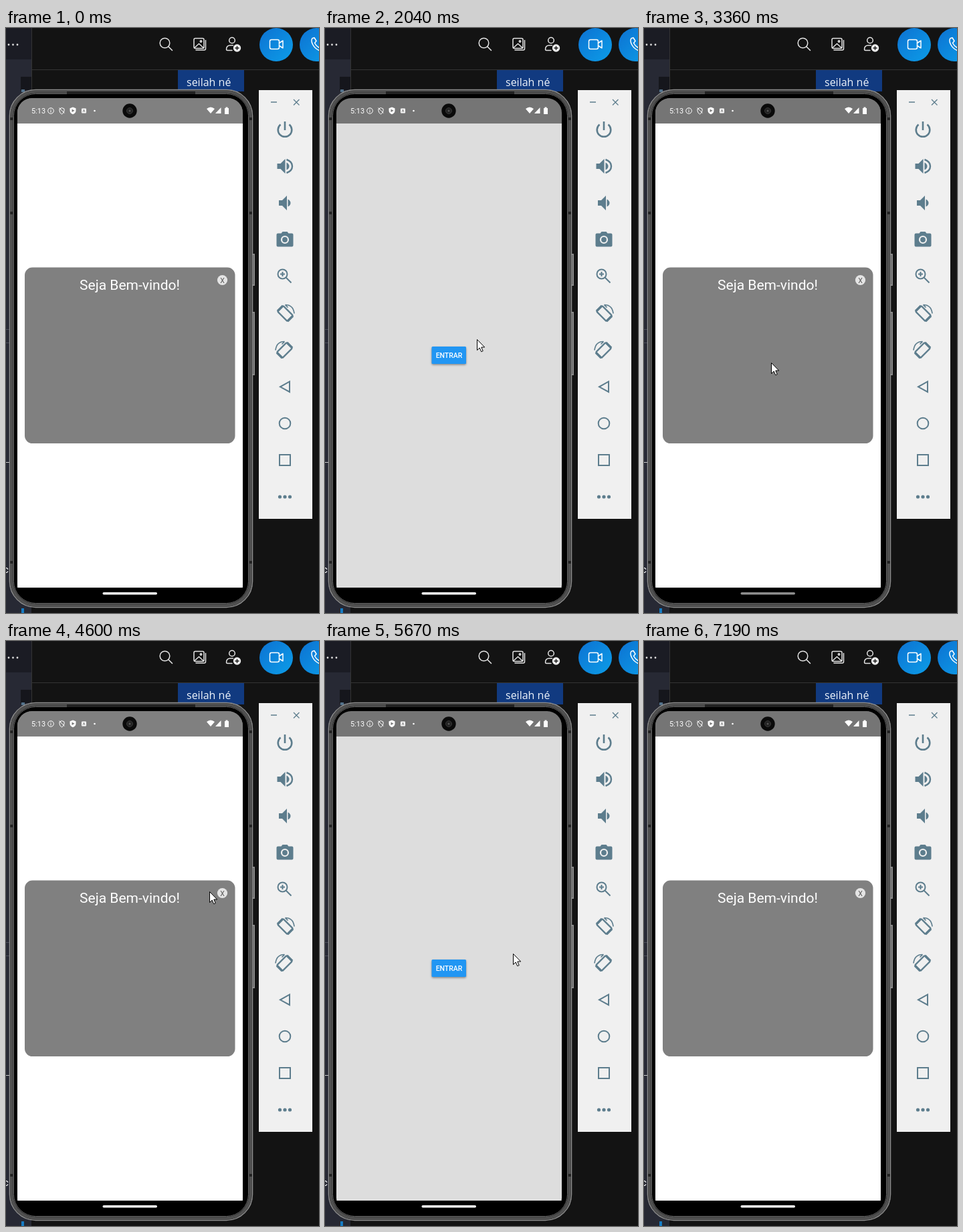
Recreate the animation shown at these times as an HTML page. Size 468x876 px, loop 7.26 s.

```html
<!DOCTYPE html>
<html lang="pt">
<head>
<meta charset="utf-8">
<title>Modal</title>
<style>
  html, body { margin: 0; width: 100%; height: 100%; overflow: hidden; background: #121212; }
  svg { display: block; }
  text { font-family: Roboto, sans-serif; fill: #fff; }
  .line { fill: none; stroke: #e4e4e4; stroke-width: 1.5; stroke-linecap: round; stroke-linejoin: round; }
  .tool { fill: #5d7d8d; }
  .tool .line { stroke: #5d7d8d; stroke-width: 2; stroke-linecap: butt; stroke-linejoin: miter; }
</style>
</head>
<body>
<svg width="468" height="876" viewBox="0 0 468 876">
  <defs>
    <linearGradient id="blue" x1="0" y1="0" x2="1" y2="1">
      <stop stop-color="#0d72d2"/><stop offset="1" stop-color="#0c9de8"/>
    </linearGradient>
    <clipPath id="screen"><rect x="17" y="105" width="337" height="751" rx="22"/></clipPath>
    <filter id="soft" x="-20%" y="-40%" width="140%" height="200%"><feGaussianBlur stdDeviation="1.5"/></filter>
    <g id="rotate" fill="none" stroke="#5d7d8d">
      <rect x="-6" y="-10.500" width="12" height="21" rx="1.500" transform="rotate(-45)" stroke-width="2.200"/>
      <path d="M-11.500-3.500l8-8M3.500 11.500l8-8" stroke-width="3.500"/>
      <path d="M0-13Q12-13 13.500 0M0-13l4 4" stroke-width="1.700"/>
    </g>
  </defs>

  <!-- desktop -->
  <path fill="#131313" d="M0 0H468V876H0Z"/>
  <path fill="#272934" d="M0 0H38V876H0Z"/>
  <path fill="#1b1c24" d="M0 0H38V47H0Z"/>
  <path fill="#15161c" d="M22 73H38V93H22Z"/>
  <path fill="#53728b" d="M23 92H28V96H23Z"/>
  <path fill="#343434" d="M38 0H39V93H38ZM39 62H468V63H39Z"/>
  <path fill="#4b4d58" d="M0 451H6V452H0ZM0 471H6V472H0Z"/>
  <path fill="#ccc" d="M0 650H6V651H0Z"/>
  <path fill="#167cc4" d="M23 869H27V876H23Z"/>
  <text x="-4" y="816" font-size="15">c</text>
  <g fill="#ddd"><circle cx="4" cy="25" r="1.400"/><circle cx="10.500" cy="25" r="1.400"/><circle cx="17" cy="25" r="1.400"/></g>

  <!-- call bar -->
  <g class="line">
    <circle cx="237.500" cy="22.500" r="7.300"/><path d="M243 28l5.500 5.500"/>
    <rect x="281" y="15.500" width="15" height="15" rx="2"/>
    <path d="M298.500 18.500V31q0 2-2 2H284M282 29.500l6.500-6 7 6.500"/><circle cx="291.500" cy="20" r="1.200"/>
    <circle cx="338" cy="18.500" r="4.300"/><path d="M338 33.500H331q-1.500 0-1.500-1.500 0-6 6-6h4"/>
  </g>
  <circle cx="345.500" cy="30" r="5.700" fill="#eee"/>
  <path d="M342.500 30h6M345.500 27v6" stroke="#131313" stroke-width="1.300"/>
  <g fill="url(#blue)"><circle cx="404" cy="25" r="25"/><circle cx="464" cy="25" r="25"/></g>
  <g class="line" style="stroke:#fff">
    <rect x="394.500" y="17.500" width="14" height="14" rx="2.500"/><path d="M408.500 22.500l5.500-3.500v11l-5.500-3.500"/>
    <path d="M458 15.500l3-1 3 5-2.500 3q2 4 6.500 7M458 15.500c-3 4 1 14 10 18"/>
  </g>
  <path fill="#113a80" d="M257 63H356V95H257Z"/>
  <text x="270" y="87" font-size="16" style="font-family:'Open Sans',sans-serif;fill:#eef4fb">seilah né</text>

  <!-- phone body -->
  <path fill="#8a8a8a" d="M367 338h5v48h-5zM367 425h5v95h-5z"/>
  <path fill="#444" d="M367 340h3v44h-3zM367 427h3v91h-3z"/>
  <rect x="5.500" y="92.500" width="363" height="775" rx="39" fill="#000" stroke="#909090" stroke-width="1.500"/>
  <rect x="8.500" y="95.500" width="357" height="769" rx="36" fill="none" stroke="#505050" stroke-width="4.500"/>
  <rect x="11.500" y="98.500" width="351" height="763" rx="33" fill="none" stroke="#666"/>
  <path fill="#222" d="M91 95H283V99H91ZM6 134h4v4h-4zM6 275h4v4h-4zM6 798h4v4h-4zM364 134h4v4h-4zM364 275h4v4h-4zM364 798h4v4h-4z"/>

  <!-- app window, with the modal window sliding over it -->
  <g clip-path="url(#screen)" text-anchor="middle">
    <path fill="#757575" d="M17 105H354V143H17Z"/>
    <path fill="#ddd" d="M17 143H354V838H17Z"/>
    <rect x="159.500" y="478.500" width="51.500" height="26" rx="2" fill="#0006" filter="url(#soft)"/>
    <rect x="159.500" y="477" width="51.500" height="26" rx="1.500" fill="#2196f3"/>
    <text x="185.500" y="494.300" font-size="10.500" font-weight="500">ENTRAR</text>
    <g id="modal">
      <path id="status" d="M17 105H354V143H17Z"/>
      <path fill="#fff" d="M17 143H354V838H17Z"/>
      <path d="M17 838H354V856H17Z"/>
      <rect x="28" y="358.600" width="314.500" height="263.400" rx="11.500" fill="#808080"/>
      <text x="185" y="392" font-size="21">Seja Bem-vindo!</text>
      <circle cx="323.500" cy="377.500" r="7.600" fill="#e4e4e4"/>
      <text id="close" x="323.500" y="381.500" font-size="10.500" style="fill:#555">X</text>
    </g>
  </g>

  <!-- system bars -->
  <text x="38" y="127.500" font-size="10.900">5:13</text>
  <g fill="none" stroke="#fff">
    <circle cx="67" cy="124" r="4.300"/><path d="M67 123v3.500M67 121v1"/>
    <path d="M83.500 119.500l3.500 1.500v3q0 3-3.500 5-3.500-2-3.500-5v-3zM79.500 119.500l8 8"/>
  </g>
  <g fill="#fff">
    <path d="M100 118.500l4.500 1.800v3.500q0 3.500-4.500 5.500-4.500-2-4.500-5.500v-3.500z"/>
    <path fill="#777" d="M98.500 121.500l4 2.300-4 2.300z"/>
    <rect x="113" y="120.500" width="7" height="7" rx="1"/>
    <path d="M115 126l1.500-4 1.500 4" fill="none" stroke="#777"/>
    <circle cx="132.500" cy="124" r="1.300"/>
    <path d="M300 121q6-5 12 0l-6 7zM313 128h8.500v-9zM327 120h1.500v-1.500h3V120h1.500v9h-6z"/>
  </g>
  <circle cx="185" cy="124" r="10.700" fill="#0a0a0a"/>
  <circle cx="185" cy="124" r="4.500" fill="#222" stroke="#383838"/>
  <circle cx="185" cy="124" r="1.500" fill="#555"/>
  <rect id="pill" x="144.500" y="845" width="81.500" height="3.500" rx="1.700"/>

  <!-- emulator tools -->
  <path fill="#f0f0f0" d="M378 93H458V735H378Z"/>
  <g class="tool">
    <path class="line" style="stroke-width:1.300" d="M396 111h9M430 107l8.500 8.500M438.500 107l-8.500 8.500"/>
    <path class="line" style="stroke-width:2.600" d="M417 140v13M410.500 144.500a10.300 10.300 0 1 0 13 0"/>
    <path d="M405.500 203v8h5l7 7v-22l-7 7zM419.500 201.500q4 2 4 5.500t-4 5.500z"/>
    <path class="line" style="stroke-width:2.400" d="M419.500 197q8.500 3 8.500 10t-8.500 10"/>
    <path d="M408 258v8h5l7 7v-22l-7 7zM421.500 256.500q4 2 4 5.500t-4 5.500z"/>
    <path d="M406.500 307.500h5l2-2.500h7l2 2.500h5q2 0 2 2v16q0 2-2 2h-21q-2 0-2-2v-16q0-2 2-2z"/>
    <circle cx="417" cy="317" r="5" fill="#5d7d8d" stroke="#f0f0f0" stroke-width="2.200"/>
    <circle class="line" cx="413.500" cy="368.500" r="7"/>
    <path class="line" d="M418.500 373.500l8 8M410 368.500h7M413.500 365v7"/>
    <use href="#rotate" x="417.500" y="427.500"/>
    <use href="#rotate" transform="translate(416.500 482.500) scale(-1 1)"/>
    <path class="line" d="M424 529.500v15.500l-14-7.700z"/>
    <circle class="line" cx="417" cy="592" r="8.300"/>
    <path class="line" d="M409 639h16v16h-16z"/>
    <circle cx="409.500" cy="702" r="2.600"/><circle cx="417" cy="702" r="2.600"/><circle cx="424.500" cy="702" r="2.600"/>
  </g>

  <path id="cursor" fill="#fff" stroke="#000" d="M.5.5V16.500L4.200 13 6.700 18.700 9.200 17.600 6.800 12H11.700Z"/>
</svg>
<script>
const LOOP = 7260, START = 130, END = 7180, TICK = 68.56;
const HEIGHT = 751, SLIDE = 300;
const CLOSE1 = 1470, OPEN1 = 2960, CLOSE2 = 5230, OPEN2 = 6740;
const [status, modal, close, pill, cursor] =
  ['status', 'modal', 'close', 'pill', 'cursor'].map(id => document.getElementById(id));

// Pointer tip: time, x, y
const path = [
  [130, 386, 862], [340, 240, 600], [480, 136, 470], [650, 250, 385], [810, 322, 356],
  [900, 320, 372], [1200, 318, 380], [1500, 318, 380], [2050, 227, 466], [2320, 188, 492],
  [2870, 188, 492], [3000, 190, 501], [3400, 190, 501], [3630, 225, 480], [3950, 380, 430],
  [4320, 318, 405], [4450, 260, 412], [4586, 304, 375], [4850, 322, 367], [5080, 318, 379],
  [5240, 318, 379], [5683, 281, 468], [5810, 270, 472], [6100, 190, 495], [6720, 190, 495],
  [6850, 230, 560], [7000, 360, 740], [7130, 443, 876]
];

const ramp = (t, from, to) => Math.min(1, Math.max(0, (t - from) / (to - from)));
const ease = p => (1 - Math.cos(Math.PI * p)) / 2;
const slide = (t, from) => ease(ramp(t, from, from + SLIDE));
// 0 when the modal is open, 1 when it is below the screen
const offset = t => slide(t, CLOSE1) - slide(t, OPEN1) + slide(t, CLOSE2) - slide(t, OPEN2);
const within = (t, from, to) => t >= from && t < to;
const pillDim = t => ramp(t, OPEN1 + 310, OPEN1 + 400) - ramp(t, OPEN1 + 700, OPEN1 + 850);

function pointer(t) {
  const i = Math.max(1, path.findIndex(p => p[0] >= t));
  const [a, b] = [path[i - 1], path[i]], k = ramp(t, a[0], b[0]);
  return [1, 2].map(n => Math.round(a[n] + (b[n] - a[n]) * k));
}

function draw(now) {
  const time = now % LOOP;
  const t = time < START ? 0 : START + Math.floor((time - START + 16) / TICK) * TICK;
  const settled = t < OPEN1 || within(t, OPEN1 + 1000, OPEN2);
  const pressed = within(t, 1250, OPEN1) || within(t, CLOSE2 - 90, OPEN2);
  status.setAttribute('fill', settled ? '#808080' : '#757575');
  modal.setAttribute('transform', `translate(0 ${offset(t) * HEIGHT})`);
  close.style.opacity = pressed ? .6 : 1;
  const grey = 255 - 125 * pillDim(t);
  pill.setAttribute('fill', `rgb(${grey},${grey},${grey})`);
  const visible = within(t, START, path.at(-1)[0]);
  cursor.style.display = visible ? '' : 'none';
  if (visible) cursor.setAttribute('transform', `translate(${pointer(t)})`);
  requestAnimationFrame(draw);
}
requestAnimationFrame(draw);
</script>
</body>
</html>
```
